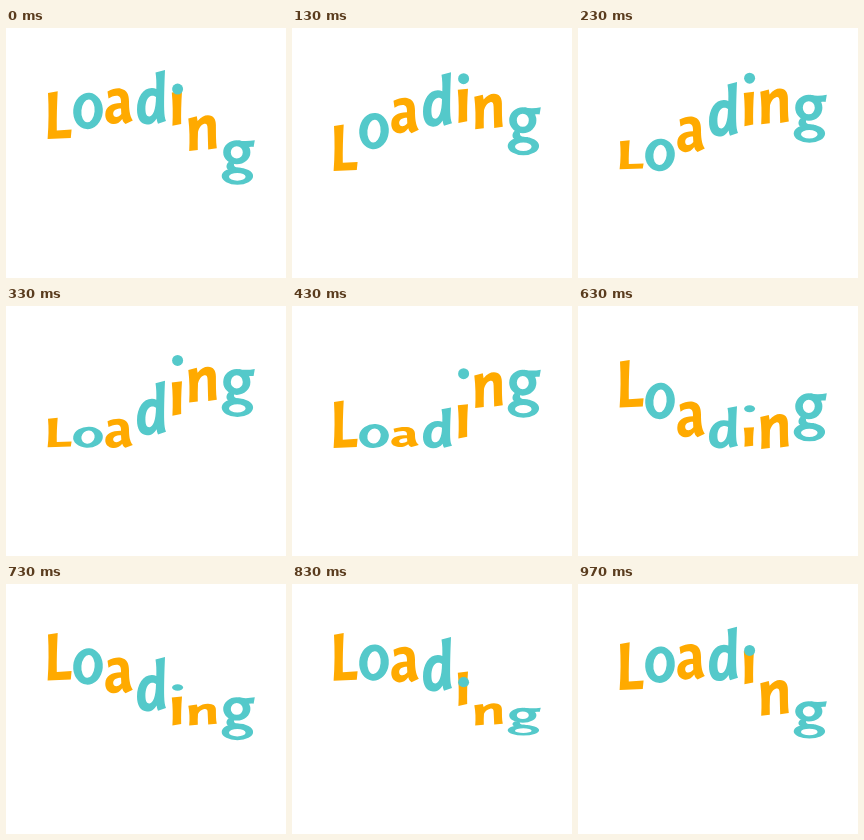
Write an HTML page that moves like this. It is 280 by 250 pixels and loops after 1000 ms.

```html
<!DOCTYPE html>
<html lang="en">
<head>
<meta charset="utf-8">
<title>Loading</title>
<style>
  html, body { margin: 0; width: 100%; height: 100%; overflow: hidden; background: #fff; }
  svg { display: block; width: 100%; height: 100%; }
  .warm { fill: #ffaa00; }
  .cool { fill: #54c9ca; }
  path { fill-rule: evenodd; }
</style>
</head>
<body>
<!-- Letters are drawn at the top of their jump; data-pivot is the height they squash towards. -->
<svg viewBox="0 0 280 250" role="img" aria-label="Loading">
  <g class="part warm" data-pivot="91">
    <path d="M42 50.2L51.7 48.6C51 62 50.6 75 50.8 87.8L65.6 86.8L64.8 95.2L41.6 96.2C42.8 81 42.8 65 42 50.2Z"/>
  </g>
  <g class="part cool" data-pivot="92">
    <path transform="rotate(5 82 78.5)" d="M67.2 78.5a14.8 18.2 0 1 0 29.6 0a14.8 18.2 0 1 0 -29.6 0Z
      M75.4 78.5a6.6 11.4 0 1 0 13.2 0a6.6 11.4 0 1 0 -13.2 0Z"/>
  </g>
  <g class="part warm" data-pivot="92">
    <path d="M101.5 63C107 60 112 59.5 115 60.2C121 61.5 123 66 123 73C123 80 123.5 87 126.8 92L119.5 95.5
      C117.5 94 116.8 92.5 116.3 90.5C113.5 94.5 110 96 107 95.6C102 95 99 91 99.3 85.5C99.8 78 106 74.5 115 74.6
      C115.2 69.5 114 67.2 110.5 67.2C107.5 67.2 105 68.5 102.5 70Z
      M115 80C109.5 80 107 82.3 107.2 85.6C107.5 89.5 112.5 89.5 115.3 85.5Z"/>
  </g>
  <g class="part cool" data-pivot="92">
    <path d="M149.5 44.5L159 42C158.3 58 158 72 158.2 82C158.4 87 158.8 90 160 93L152 95.6
      C151.3 94 150.8 92.3 150.6 90.3C148.5 94.2 145 96.6 141 96.4C134.5 96 131 90.5 131 81.5
      C131 69 137.5 59.8 146 60C147.7 60 149 60.3 150.3 60.9C150.5 55 150.3 49.5 149.5 44.5Z
      M150 69C148.5 67.8 147 67.5 145.6 67.7C141.5 68.5 139.3 74 139.4 81C139.5 86.5 141 88.6 143.5 88.4C147 88 149.8 82 150 69Z"/>
  </g>
  <g class="part warm" data-pivot="92">
    <path d="M165.8 61.8L176 60.6C175.2 72 175 83 175.2 93.2L166.4 95C167 84 166.8 72 165.8 61.8Z"/>
  </g>
  <g class="part cool" data-pivot="66">
    <circle cx="171.6" cy="50" r="5.5"/>
  </g>
  <g class="part warm" data-pivot="92">
    <path d="M182.3 63.5L190.8 61.3L191.6 66.2C195 62 198.5 60.2 202 60.3C207.5 60.5 209.8 64 209.9 70
      C210 78 209.8 86 210.8 93.3L202.2 94.6C202 87 201.8 80 201.6 73.5C201.5 69.5 200.3 68.3 198.2 68.9
      C195.5 69.7 193 73 192 77C191.7 83 191.7 89 191.8 95L183.2 96C183.8 85 183.6 74 182.3 63.5Z"/>
  </g>
  <g class="part cool" data-pivot="96">
    <path d="M217.2 75.8a13.6 13 0 1 0 27.2 0a13.6 13 0 1 0 -27.2 0Z
      M224.8 75.8a6 6.6 0 1 0 12 0a6 6.6 0 1 0 -12 0Z"/>
    <path d="M232 62.8C238 64.2 243 63.8 248.8 62.8L247.6 70C245 69.6 243 69.8 240.5 71Z"/>
    <path d="M223 86C219.5 89 219.5 94 224 95.5L236 96.5L236 92.8C230 92.6 227.5 92 228 88Z"/>
    <path d="M215.7 101.5a15.7 9.3 0 1 0 31.4 0a15.7 9.3 0 1 0 -31.4 0Z
      M223 102.3a8.3 4.2 0 1 0 16.6 0a8.3 4.2 0 1 0 -16.6 0Z"/>
  </g>
</svg>
<script>
  const LOOP = 1000, STEP = LOOP / 30;
  const PEAK = 780, LAG = LOOP / 12;       // time of the first peak, delay per part
  const HALF = 350, GROUND = LOOP - 2 * HALF;
  const DROP = 47, SQUASH = 0.44;
  const parts = [...document.querySelectorAll('.part')];
  const mod = (a, n) => ((a % n) + n) % n;

  function pose(t) {
    const tau = mod(t - PEAK + HALF, LOOP) - HALF;
    if (tau < HALF) return { y: DROP * (Math.abs(tau) / HALF) ** 2.5, s: 1 };
    const press = Math.sin(Math.PI * (tau - HALF) / GROUND);
    return { y: DROP, s: 1 - SQUASH * Math.max(0, press) ** 0.9 };
  }

  function draw() {
    // the picture advances 30 times a second, on 10 ms ticks
    const tick = Math.floor(mod(performance.now(), LOOP) / 10) * 10;
    const t = Math.floor((tick + 5) / STEP) * STEP;
    parts.forEach((part, i) => {
      const { y, s } = pose(t - i * LAG);
      const shift = y + part.dataset.pivot * (1 - s);
      part.setAttribute('transform', `matrix(1 0 0 ${s} 0 ${shift})`);
    });
    requestAnimationFrame(draw);
  }
  draw();
</script>
</body>
</html>
```
